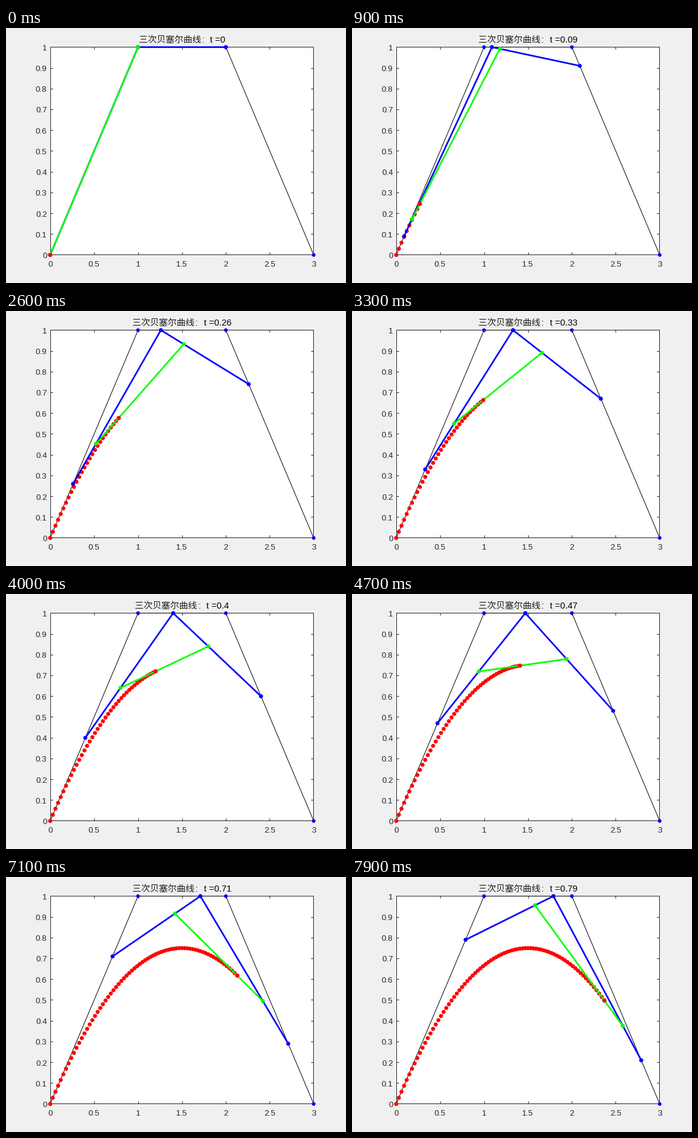
These frames come from a looping animation (560x420 px, 8000 ms). A matplotlib script:

```python
import matplotlib.pyplot as plt
import numpy as np
from matplotlib.animation import FuncAnimation
from matplotlib.patches import Circle

W, H, DPI = 560, 420, 80
PX = 72 / DPI  # points per pixel
LEFT, TOP, AW, AH = 72.8, 31.5, 434, 342.3
FRAMES, INTERVAL = 80, 100
INK = "#262626"
BLUE, GREEN, RED = "#0000ff", "#00ff00", "#ff0000"
EM = 14.67  # title size in pixels
TITLE = "三次贝塞尔曲线"

CTRL = np.array([[0, 0], [1, 1], [2, 1], [3, 0]], float)


def to_px(pts):
    """Plot coordinates to stage pixels, y downwards."""
    return np.array([LEFT, TOP + AH]) + pts * [AW / 3, -AH]


def reduce_once(pts, t):
    return pts[:-1] * (1 - t) + pts[1:] * t


def levels(t):
    """Quadratic, linear and final points of de Casteljau's scheme."""
    a = reduce_once(to_px(CTRL), t)
    b = reduce_once(a, t)
    return a, b, reduce_once(b, t)


fig = plt.figure(figsize=(W / DPI, H / DPI), dpi=DPI, facecolor="#f0f0f0")

# Frame with ticks, aligned to whole pixel rows and columns
x0, y0, fw, fh = 73.3, 31.3, 433, 342
frame = fig.add_axes([x0 / W, 1 - (y0 + fh) / H, fw / W, fh / H])
xticks, yticks = np.arange(7) / 2, np.arange(11) / 10
frame.set(xlim=(0, 3), ylim=(0, 1), xticks=xticks, yticks=yticks)
frame.tick_params(direction="in", length=4.3 * PX, width=PX, color=INK,
                  top=True, right=True, labelbottom=False, labelleft=False)
for spine in frame.spines.values():
    spine.set(linewidth=PX, edgecolor=INK)

# Transparent stage measured in pixels
stage = fig.add_axes([0, 0, 1, 1])
stage.set(xlim=(0, W), ylim=(H, 0))
stage.axis("off")


def label(x, y, text, size, font="Liberation Sans", color=INK, ha="left"):
    return stage.text(x, y, text, fontsize=size * PX, family=font,
                      color=color, ha=ha, va="baseline")


def stroke(color, width, z):
    line, = stage.plot([], [], color=color, lw=width * PX, zorder=z,
                       snap=False)
    return line


def dots(pts, color, radius, z):
    return [stage.add_patch(Circle(p, radius, fc=color, lw=0, zorder=z))
            for p in pts]


def place(line, marks, pts):
    line.set_data(*pts.T)
    for mark, p in zip(marks, pts):
        mark.center = p


for v in xticks:
    label(LEFT + AW * v / 3, 393, f"{v:g}", 13.33, ha="center")
for v in yticks:
    label(67.6, TOP + AH * (1 - v) + 5.2, f"{v:g}", 13.33, ha="right")

hull = to_px(CTRL)
stroke("black", 1, 3).set_data(*hull.T)
dots(hull, BLUE, 3, 4)
curve = np.vstack([levels(i / 100)[2] for i in range(FRAMES)])
trail = dots(curve, RED, 3.33, 5)
outer, outer_dots = stroke(BLUE, 2.67, 6), dots(hull[:3], BLUE, 3.33, 7)
inner, inner_dots = stroke(GREEN, 2.67, 8), dots(hull[:2], GREEN, 3.33, 9)
tip, = dots(curve[:1], RED, 3.33, 10)

name = label(0, 24, TITLE, EM, "Noto Sans CJK JP", "#1c1c1c")
colon = label(0, 24, ":", EM, color="black")
value = label(0, 24, "", EM, color="black")


def update(i):
    t = i / 100
    a, b, c = levels(t)
    place(outer, outer_dots, a)
    place(inner, inner_dots, b)
    tip.center = c[0]
    for k, mark in enumerate(trail):
        mark.set_visible(k <= i)

    value.set_text(f"t ={t:g}")
    head = EM * (len(TITLE) + 1)
    x = LEFT + AW / 2 - (head + value.get_window_extent().width) / 2
    name.set_x(x)
    colon.set_x(x + EM * len(TITLE) + 1)
    value.set_x(x + head)
    return [outer, inner, tip, name, colon, value]


anim = FuncAnimation(fig, update, frames=FRAMES, interval=INTERVAL,
                     repeat=True, repeat_delay=0, blit=False)
plt.show()
```
